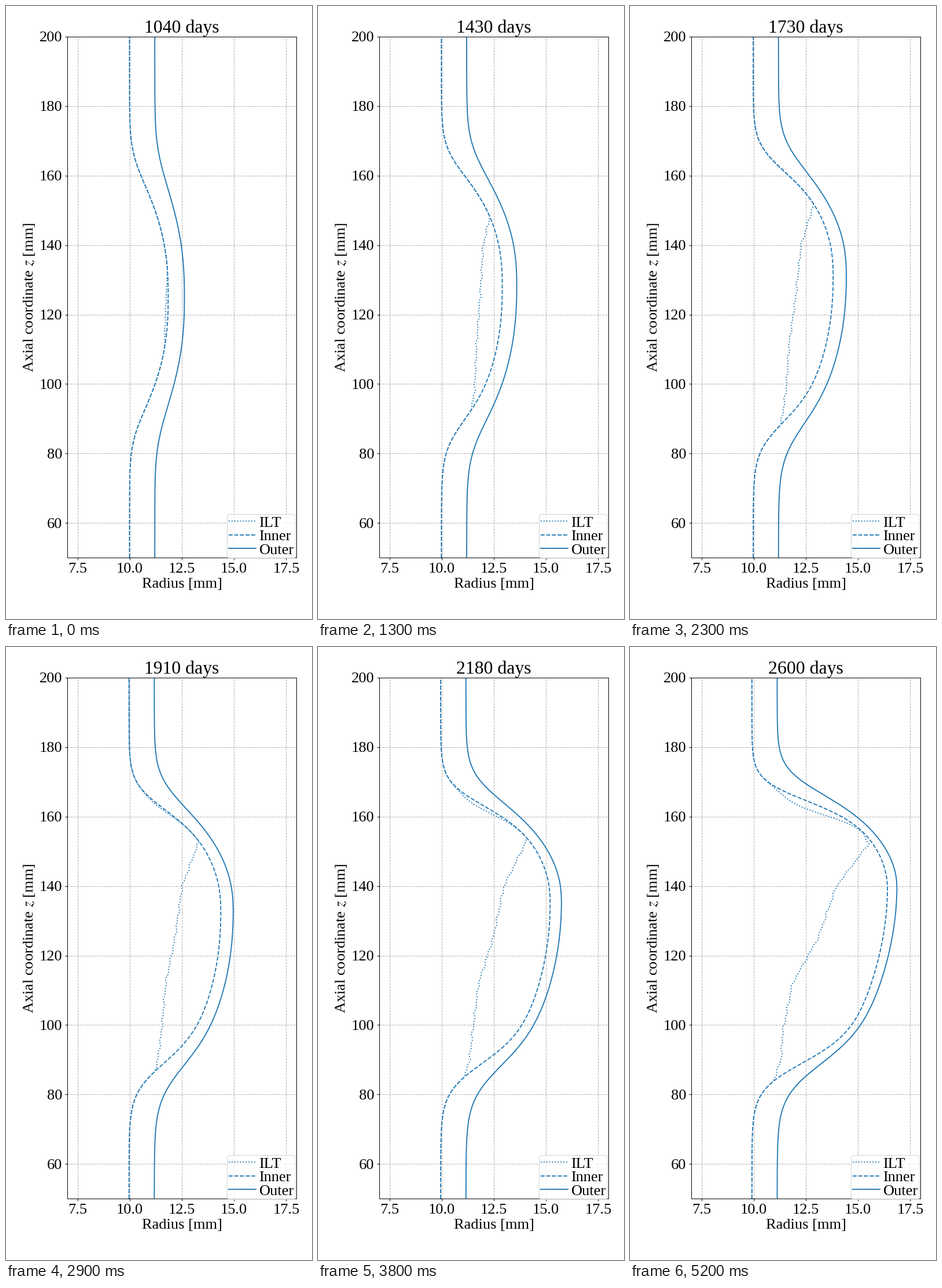
Animation, 529 px wide and 1058 px high, one loop 5300 ms. Source, as a matplotlib script:

```python
import matplotlib.pyplot as plt
import numpy as np
from matplotlib.animation import FuncAnimation

W, H, DPI = 529, 1058, 92
FRAMES, INTERVAL = 53, 100
BOX = [0.2, 0.1, 0.7497, 0.85]
R_MIN, R_MAX = 7, 18
PX_PER_MM = BOX[2] * W / (R_MAX - R_MIN)
BLUE = "#1f77b4"


def px(value):
    """Pixels to points."""
    return value * 72 / DPI


plt.rcParams.update({
    "font.family": "Liberation Serif",
    "mathtext.fontset": "stix",
    "font.size": px(26.4),
    "axes.titlesize": px(31.8),
    "axes.titlepad": px(7.35),
    "axes.labelpad": px(4.4),
    "axes.linewidth": px(0.98),
    "lines.linewidth": px(1.84),
    "patch.linewidth": px(1.2),
    "grid.linewidth": px(0.98),
    "grid.linestyle": "--",
})
for axis in ("xtick", "ytick"):
    plt.rcParams[axis + ".major.size"] = px(4.29)
    plt.rcParams[axis + ".major.pad"] = px(4.29)
    plt.rcParams[axis + ".major.width"] = px(0.98)

Z = np.linspace(50, 200, 301)

# Each pair holds a value on the first and on the last day.
# Height is in pixels; all other lengths are in mm.
OUTER = dict(base=11.2, height=(51.2, 207), peak=(125, 140),
             lower=dict(edge=(84, 87), width=(6, 5), spread=(37.5, 74)),
             upper=dict(edge=(166, 169), width=(6, 4), spread=(37.5, 35.8)))
INNER = dict(base=9.989, height=(66.9, 234.3), peak=(125, 139.5),
             lower=dict(edge=(86.5, 88), width=(5, 4.1), spread=(38, 78)),
             upper=dict(edge=(163.5, 165.8), width=(5, 3.2), spread=(38, 40)))

# Thrombus surface in stage pixels at a few heights.
CLOT_Z = [84, 90, 98, 112, 125, 140, 152, 157]
CLOT_START = np.array([255, 263, 271, 274, 277, 281, 295, 330])
CLOT_END = np.array([248, 261, 264, 281, 325, 357, 412, 400])


def blend(pair, t):
    return pair[0] + (pair[1] - pair[0]) * t


def flank(side, peak, p):
    """Rounded dome that fades out at a soft edge."""
    edge = abs(blend(side["edge"], p ** 1.5) - peak)
    distance = abs(Z - peak)
    dome = np.exp(-(distance / blend(side["spread"], p ** 0.85)) ** (2.5 - 0.5 * p))
    return dome / (1 + np.exp((distance - edge) / blend(side["width"], p)))


def wall(shape, p):
    peak = blend(shape["peak"], p)
    height = blend(shape["height"], p) - 40 * p * (1 - p) * (0.72 - p)
    profile = np.where(Z < peak, flank(shape["lower"], peak, p),
                       flank(shape["upper"], peak, p))
    return shape["base"] - 0.078 * p ** 2 + height * profile / PX_PER_MM


def clot(inner, p):
    surface_px = np.interp(Z, CLOT_Z, blend((CLOT_START, CLOT_END), p ** 2))
    surface = R_MIN + (surface_px - BOX[0] * W) / PX_PER_MM
    gap = np.where((Z > 83) & (Z < 157), np.maximum(inner - surface, 0), 0)
    ripple = np.sin(2.1 * Z + 10 * p) + 0.8 * np.sin(1.13 * Z - 7 * p)
    gap -= ripple / PX_PER_MM * np.clip(gap * 6, 0, 1)
    # A second, thinner layer grows on the upper shoulder.
    shoulder = 72 * max(p - 0.31, 0) ** 2 * np.exp(-((Z - 162.8) / 4) ** 2)
    return inner - gap - shoulder / PX_PER_MM


fig = plt.figure(figsize=(W / DPI, H / DPI), dpi=DPI, facecolor="white")
ax = fig.add_axes(BOX)
ax.set(xlim=(R_MIN, R_MAX), ylim=(50, 200),
       xticks=np.arange(7.5, 18, 2.5), yticks=range(60, 201, 20),
       xlabel="Radius [mm]", ylabel="Axial coordinate $z$ [mm]")
ax.grid(True)
title = ax.set_title("")
ilt_line, = ax.plot([], [], ":", color=BLUE, label="ILT")
inner_line, = ax.plot([], [], "--", color=BLUE, label="Inner")
outer_line, = ax.plot([], [], "-", color=BLUE, label="Outer")
ax.legend(loc="lower right", bbox_to_anchor=(500.3 / W, 104.8 / H),
          bbox_transform=fig.transFigure, borderaxespad=0, borderpad=0.1,
          labelspacing=0, handlelength=1.8, handletextpad=0.2)


def update(k):
    p = k / (FRAMES - 1)
    inner = wall(INNER, p)
    ilt_line.set_data(clot(inner, p), Z)
    inner_line.set_data(inner, Z)
    outer_line.set_data(wall(OUTER, p), Z)
    title.set_text(f"{1040 + 30 * k} days")
    return ilt_line, inner_line, outer_line, title


anim = FuncAnimation(fig, update, frames=FRAMES, interval=INTERVAL,
                     repeat=True, repeat_delay=0)
plt.show()
```
